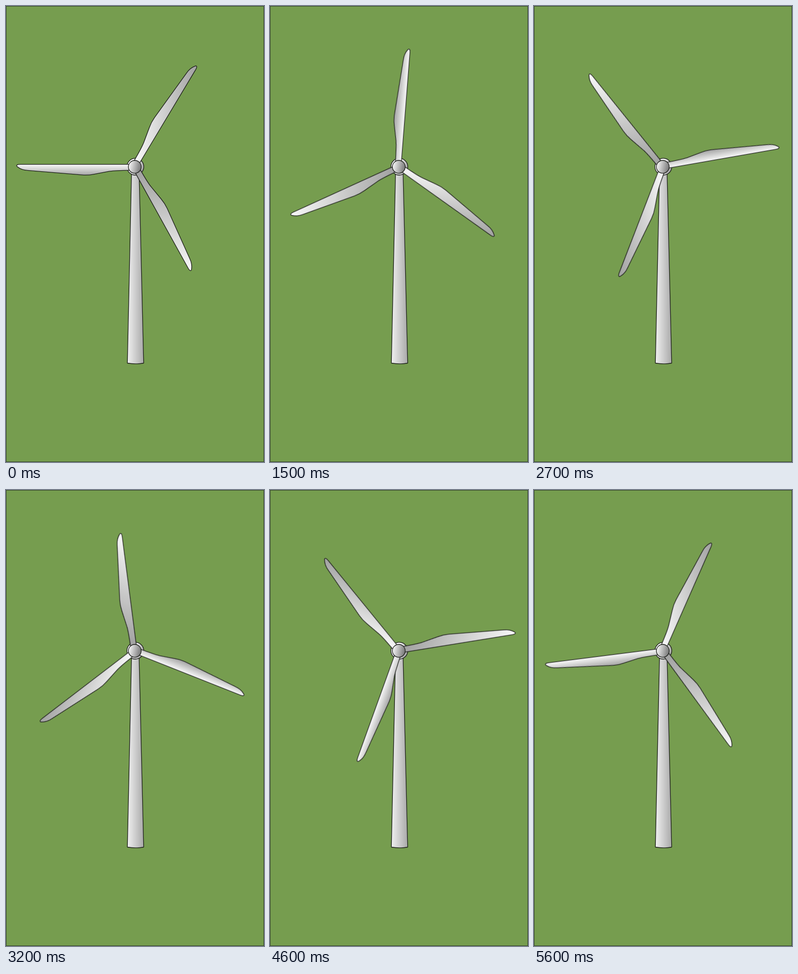
These frames come from a looping animation (500x883 px, 5.7 s). An HTML page without scripts:

```html
<!DOCTYPE html>
<html lang="en">
<head>
<meta charset="utf-8">
<title>Wind turbine</title>
<style>
  html, body { margin: 0; width: 100%; height: 100%; overflow: hidden; background: #769d4f; }
  svg { display: block; width: 100%; height: 100%; }
  .line { stroke: #1e201c; stroke-width: 1.3; stroke-linejoin: round; }
  .rotor { transform-origin: 249.3px 311.2px; animation: spin 5.7s steps(57) infinite; }
  /* 6.3 degrees per step; the last step closes the turn */
  @keyframes spin { to { transform: rotate(359.1deg); } }
</style>
</head>
<body>
<svg viewBox="0 0 500 883">
  <defs>
    <linearGradient id="mast">
      <stop offset="0" stop-color="#f0f0f0"/>
      <stop offset="1" stop-color="#a9a9a9"/>
    </linearGradient>
    <linearGradient id="collar" x1="0.1" y1="0.2" x2="1" y2="0.6">
      <stop offset="0.25" stop-color="#fff"/>
      <stop offset="1" stop-color="#a4a4a4"/>
    </linearGradient>
    <linearGradient id="hub" x1="0" y1="0.4" x2="1" y2="0.6">
      <stop offset="0" stop-color="#f8f8f8"/>
      <stop offset="1" stop-color="#747474"/>
    </linearGradient>

    <linearGradient id="shade">
      <stop offset="0" stop-color="#f8f8f8"/>
      <stop offset="1" stop-color="#a2a2a2"/>
    </linearGradient>
    <linearGradient id="shadeA" href="#shade" gradientUnits="userSpaceOnUse"
      x1="0" y1="307" x2="0" y2="328"/>
    <linearGradient id="shadeB" href="#shade" gradientUnits="userSpaceOnUse"
      x1="250" y1="0" x2="370" y2="0" gradientTransform="rotate(-121 249.3 311.2)"/>
    <linearGradient id="shadeC" href="#shade" gradientUnits="userSpaceOnUse"
      x1="0" y1="513" x2="0" y2="320" gradientTransform="rotate(-241 249.3 311.2)"/>

    <path id="blade" class="line" d="M244 306.6H28C21 306.6 18.8 308.6 22 311.2
      C27 315.2 34 317.9 42 318.4L148 327.2C158 328 163 327.2 170 325.8
      L200 320.2C212 318.2 222 318.2 244 318Z"/>
  </defs>

  <rect width="500" height="883" fill="#769d4f"/>
  <rect x="0.5" y="0.5" width="499" height="882" fill="none" stroke="#35462a"/>

  <path class="line" fill="url(#mast)" d="M243.4 318H257.8L266.8 691.5Q251 694.4 235.2 691.5Z"/>
  <circle class="line" fill="url(#collar)" cx="250.7" cy="311.2" r="16.3"/>

  <g class="rotor">
    <use href="#blade" fill="url(#shadeA)"/>
    <use href="#blade" fill="url(#shadeB)" transform="rotate(121 249.3 311.2)"/>
    <use href="#blade" fill="url(#shadeC)" transform="rotate(241 249.3 311.2)"/>
  </g>

  <circle class="line" fill="url(#hub)" cx="249.6" cy="311.4" r="12.4"/>
</svg>
</body>
</html>
```
